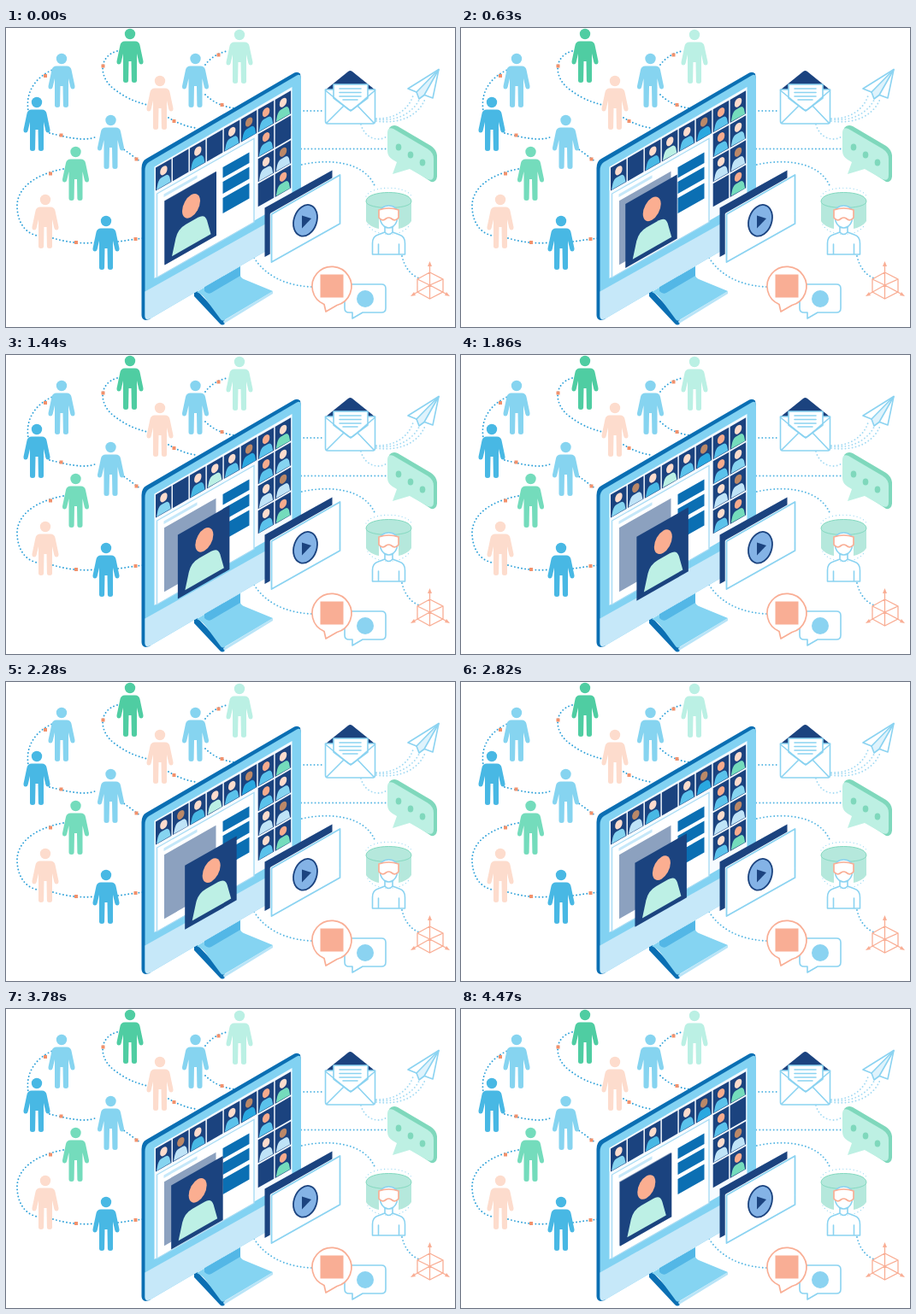
These frames come from a looping animation (525 px wide and 350 px high, 4500 ms). An HTML page:

```html
<!DOCTYPE html>
<html lang="en">
<head>
<meta charset="utf-8">
<title>Online meeting</title>
<style>
  html, body { margin: 0; width: 100%; height: 100%; overflow: hidden; background: #fff; }
  svg { display: block; width: 525px; height: 350px; }
  .line { fill: none; stroke-linejoin: round; stroke-linecap: round; }
  .dots { fill: none; stroke: #2a9fd8; stroke-width: 1.9; stroke-linecap: round; stroke-dasharray: 0 4.1; }
  .sky { stroke: #8bd3f1; stroke-width: 1.6; }
  .coral { stroke: #f9ae95; stroke-width: 1.7; }
</style>
</head>
<body>
<svg viewBox="0 0 525 350">
  <defs>
    <g id="person">
      <circle cy="6" r="6.2"/>
      <path d="M-6 14.500H6Q10.500 14.500 11.500 19L15.500 38Q15.700 41.500 13 41.500Q11 41.500 10.300 39L8 29V60.500Q7.900 63 5 63Q2 63 1.900 60.500L1.500 38H-1.500L-1.900 60.500Q-2 63-5 63Q-7.900 63-8 60.500V29L-10.300 39Q-11 41.500-13 41.500Q-15.700 41.500-15.500 38L-11.500 19Q-10.500 14.500-6 14.500Z"/>
    </g>
  </defs>

  <g id="links"></g>
  <g id="crowd"></g>

  <!-- stand -->
  <path fill="#0b6fb3" d="M220 310L224 308L256 342V346Q253 349 250 346L220 314Z"/>
  <path fill="#b9e4f7" d="M254 343L312 308V311L255 346Z"/>
  <path fill="#85d4f2" d="M223 309L274 279V289Q274 292 278 294L312 308L255 342Q253 343.500 251 341L234 318Q230 312 223 309Z"/>
  <path fill="#53b7e6" d="M232 303L274 279V290L240 310Q236 312 232 308Z"/>

  <!-- monitor -->
  <path fill="#0b6fb3" d="M158.500 164Q158.500 156 164 153L337 52.500Q341 50.500 344 53.500L345 60L168 341L163 342Q158.500 341 158.500 336Z"/>
  <path fill="#82d2f2" d="M162.500 167Q162.500 160 167 157L340 55.500Q345 53 345 60V237L169 340Q162.500 343 162.500 337Z"/>
  <path fill="#c6e8f9" d="M162.500 308.500L345 206V237L169 340Q162.500 343 162.500 337Z"/>
  <path fill="#f6fbff" d="M173.500 162.500L334.500 69V200L173.500 293Z"/>
  <g id="cells"></g>

  <!-- page -->
  <g transform="matrix(1 -.57 0 1 176.500 194)">
    <path fill="#fff" stroke="#a9dcf4" stroke-width="1.400" d="M0 0H113.500V98H0Z"/>
    <path fill="#c6e8f9" d="M8 5H47V8.500H8Z"/>
    <path fill="#0b6fb3" d="M77 13H108V25.500H77ZM77 30H108V44H77ZM77 49H108V67H77Z"/>
    <path fill="#8ca1bf" d="M8.500 13H69V88H8.500Z"/>
  </g>

  <g id="card">
    <g transform="matrix(1 -.57 0 1 185.500 202.500)">
      <path fill="#1b437f" d="M0 0H60.500V75H0Z"/>
      <path fill="#bdf0e5" d="M8.500 69.500L13 51Q15.500 41.500 25 41.500H39Q47 41.500 49.500 51L54 69.500Z"/>
      <ellipse fill="#fbae91" cx="31" cy="23.500" rx="10.500" ry="13"/>
    </g>
  </g>

  <!-- video windows -->
  <path fill="#1b437f" d="M302.500 210.500L381.500 166.500V225L302.500 268Z"/>
  <path class="line" stroke="#fff" stroke-width="3.500" d="M310.500 274V218L391 172"/>
  <path class="line" stroke="#8bd3f1" stroke-width="1.800" style="fill:#fff" d="M310.500 218L390.500 172V229L310.500 274Z"/>
  <g transform="translate(350 225.300) rotate(19)">
    <ellipse rx="13.300" ry="18.800" fill="#84b3e6" stroke="#1b437f" stroke-width="1.800"/>
  </g>
  <path fill="#1b437f" d="M346 219.500L357 223L346 234.500Z"/>

  <!-- mail -->
  <path fill="#1b437f" d="M374 72L400 51Q402.500 49 405 51L431 72Z"/>
  <path class="line sky" style="fill:#fff" d="M373.500 72V109Q373.500 112 376 112H429Q431.500 112 431.500 109V72Z"/>
  <path class="line sky" style="fill:#fff" d="M383 82V66H423V82L403 97Z"/>
  <path class="line sky" d="M373.500 73L400 95Q403 97.500 406 95L431.500 73M375 111L395 91M430 111L411 91M390 71H415M390 75.500H415M390 80H415M394 84H411"/>

  <!-- plane -->
  <path class="line sky" style="fill:#fff" d="M506 48.500L470 71L480 75L499 82Z"/>
  <path class="line sky" style="fill:#dff3fc" d="M506 48.500L480 75L483 83L489 78.500Z"/>

  <!-- chat -->
  <path fill="#7fd8bc" d="M448 117Q452 112 458 115L497 138Q503 142 504 149V174Q503 181 497 180L488 174L449 148Z"/>
  <path fill="#bdf0e3" d="M446 123Q446 115 453 118L493 141.500Q500 146 500 153V172Q500 180 493 177L472 165L452 171L457 157L452 154Q446 150 446 144Z"/>
  <g fill="#7fd8bc">
    <ellipse cx="459" cy="139.500" rx="3.300" ry="4"/>
    <ellipse cx="473" cy="148.500" rx="3.300" ry="4"/>
    <ellipse cx="487" cy="157.500" rx="3.300" ry="4"/>
  </g>

  <!-- headset -->
  <path class="line sky" style="fill:#fff" d="M428.500 265V252Q428.500 244 435 242L443 239V232H452V239L460 242Q466.500 244 466.500 252V265ZM435.500 265V253M459.500 265V253M443 239Q447.500 244 452 239"/>
  <path fill="#a8e4d6" fill-opacity=".85" d="M421 203C421 189 474 189 474 203V226C471 231 464 234 459 235V220H436V235C430 234 423 230 421 226Z"/>
  <path fill="none" stroke="#84d9c0" stroke-width="1" d="M421 203C421 189 474 189 474 203C474 213 421 213 421 203"/>
  <path class="line sky" style="fill:#fff" d="M437 219Q437 208 447.500 208Q458 208 458 219Q458 228 453 232Q447.500 236 442 232Q437 228 437 219Z"/>
  <path class="line coral" style="fill:#fff" d="M436 213Q447.500 209 459 213V222Q455 227 450.500 223Q447.500 221 444.500 223Q440 227 436 222Z"/>
  <path class="dots" style="stroke:#8bd3f1;stroke-width:1.200" d="M423 230C430 245 465 245 472 230M421 197C427 184 468 184 474 197"/>

  <!-- axes -->
  <path class="line coral" style="stroke-width:1.300" d="M495.500 286L511 294V309L495.500 317L481 309V294ZM495.500 301V277M495.500 301L516 312M495.500 301L476 312M481 294L495.500 301L511 294M495.500 301V317"/>
  <path fill="#f9ae95" d="M495.500 273L498 279H493ZM519 314L513 313L515 309ZM473 314L479 313L477 309Z"/>

  <!-- social -->
  <path class="line sky" style="fill:#fff" d="M402 300H439Q444 300 444 305V328Q444 333 439 333H417L405 340V333H401Q396 333 396 328V305Q396 300 402 300Z"/>
  <circle cx="420" cy="317" r="10" fill="#8bd3f1"/>
  <path class="line coral" style="fill:#fff" d="M374 332L372 323.500A23 23 0 1 1 387 324.500Z"/>
  <rect x="367.500" y="288.500" width="27" height="27" fill="#f9ae95"/>
</svg>

<script>
const NS = "http://www.w3.org/2000/svg";
const $ = id => document.getElementById(id);

function add(parent, tag, attrs) {
  const el = document.createElementNS(NS, tag);
  for (const k in attrs) el.setAttribute(k, attrs[k]);
  return parent.appendChild(el);
}

const PEACH = "#fddccd", CORAL = "#f8ab8d", BROWN = "#bb8868";
const SKY = "#86d4f0", BLUE = "#48b8e4", PALE = "#bfe3f7";
const GREEN = "#4fcda2", MINT = "#74dcbc", ICE = "#bbf0e4";

// standing people: x, top, colour
[
  [145, 1, GREEN], [65, 30, SKY], [36, 81, BLUE], [122.500, 102, SKY], [81.500, 139, MINT],
  [46, 195, PEACH], [117, 220, BLUE], [180, 56, PEACH], [221.500, 30, SKY], [273, 2, ICE]
].forEach(([x, y, fill]) =>
  add($("crowd"), "use", { href: "#person", transform: `translate(${x} ${y})`, fill }));

// dotted connections: path, optional colour
const PALE_DOTS = "#a5dbf3", MID_DOTS = "#56b6e3";
[
  ["M57 48C38 55 22 72 26 97"],
  ["M51 123C68 127 92 134 106 127"],
  ["M130 27C108 33 108 58 127 72S156 87 168 91"],
  ["M190 105C200 111 212 116 223 117"],
  ["M233 43C239 35 248 29 259 27"],
  ["M233 78C242 87 255 93 269 94"],
  ["M135 140L158 157"],
  ["M67 165C30 172 12 190 13 210S24 240 36 243"],
  ["M55 246C72 251 91 253 105 251"],
  ["M131 250L160 246"],
  ["M340 97H372", MID_DOTS],
  ["M337 141.500H445", MID_DOTS],
  ["M338 162C372 152 420 154 432 187", MID_DOTS],
  ["M463 267C466 280 473 289 483 293", MID_DOTS],
  ["M284 254C289 276 312 301 357 303", MID_DOTS],
  ["M415 113C420 130 436 134 447 126", PALE_DOTS],
  ["M433 106C455 107 471 95 476 79", PALE_DOTS],
  ["M433 107C459 110 477 98 484 82", PALE_DOTS],
  ["M433 109C463 113 483 101 490 83", PALE_DOTS]
].forEach(([d, stroke]) =>
  add($("links"), "path", { class: "dots", d, style: stroke ? `stroke:${stroke}` : "" }));

[[46, 56], [64.500, 125.500], [113.500, 44.500], [196.500, 109], [248.500, 31.500], [252.500, 90],
 [152.500, 153.500], [52, 170.500], [82, 251], [151.500, 247]].forEach(([x, y]) =>
  add($("links"), "rect", { x: x - 2, y: y - 2, width: 4, height: 4, fill: "#f2916c" }));

// participant tiles: column, row, head, shirt, optional on/off times
const blinking = [];
[
  [0, 0, PEACH, SKY],
  [1, 0, BROWN, PALE, 1800, 4050],
  [2, 0, PEACH, BLUE],
  [3, 0, PEACH, ICE, 225, 2475],
  [4, 0, PEACH, "#5bc2eb"],
  [5, 0, BROWN, "#2aa8e0"],
  [6, 0, CORAL, "#5bc2eb"],
  [7, 0, PEACH, MINT],
  [6, 1, CORAL, "#5bc2eb"],
  [7, 1, PEACH, SKY, 450, 3150],
  [6, 2, PEACH, PALE],
  [7, 2, BROWN, PALE],
  [6, 3, PEACH, "#5bc2eb", 900, 3600],
  [7, 3, CORAL, MINT]
].forEach(([col, row, head, shirt, on, off]) => {
  const x = 175 + col * 19.950, y = 163.500 - col * 19.950 * .57 + row * 29;
  const tile = add($("cells"), "g", { transform: `matrix(1 -.57 0 1 ${x} ${y})` });
  add(tile, "path", { d: "M0 0H18.500V27H0Z", fill: "#1b437f" });
  const body = add(tile, "g", {});
  add(body, "path", { d: "M1 26.500L2.500 20Q4 15.500 7 15.500H12Q15 15.500 16.300 20L17.500 26.500Z", fill: shirt });
  add(body, "ellipse", { cx: 9.400, cy: 8.700, rx: 4.200, ry: 5, fill: head });
  if (on) blinking.push({ body, on, off });
});

const LOOP = 4500;
const start = performance.now();

function draw(now) {
  const t = Math.max(0, now - start) % LOOP;
  const p = 1 - Math.abs(1 - 2 * t / LOOP);
  $("card").setAttribute("transform", `translate(${24 * p} ${12.500 * p})`);
  for (const { body, on, off } of blinking)
    body.setAttribute("visibility", t >= on && t < off ? "visible" : "hidden");
  requestAnimationFrame(draw);
}
draw(start);
</script>
</body>
</html>
```
